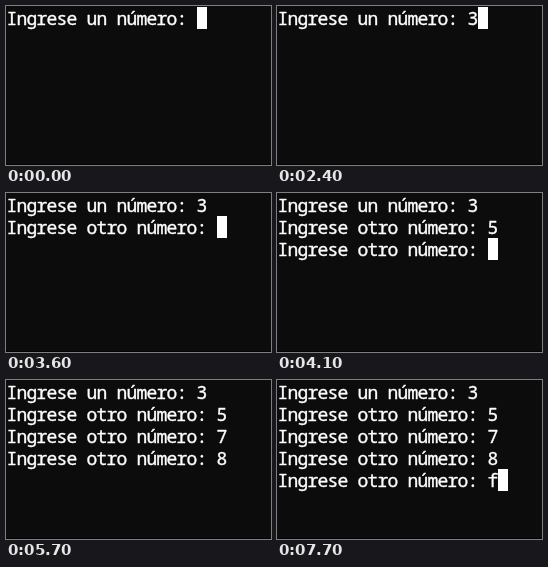
Animation, 265 px wide and 159 px high, one loop 8000 ms. Source, as an HTML page with a canvas:

```html
<!DOCTYPE html>
<html lang="es">
<head>
<meta charset="utf-8">
<style>
html, body { margin: 0; width: 100%; height: 100%; overflow: hidden; background: #0c0c0c; }
canvas { display: block; }
</style>
</head>
<body>
<canvas id="term" width="265" height="159"></canvas>
<script>
const ctx = document.getElementById('term').getContext('2d');
const LOOP = 8000, CELL = 10, ROW = 22;

// [start ms, answers so far (a comma is Enter), cursor visible]
const steps = [
  [0, '', 1], [500, '', 0], [1100, '', 1],
  [1700, '3', 1], [2200, '3', 0], [2400, '3', 1],
  [2900, '3,', 1], [3000, '3,', 0], [3600, '3,', 1],
  [3900, '3,5', 1], [4100, '3,5,', 1],
  [4800, '3,5,7', 1], [4900, '3,5,7,', 1],
  [5200, '3,5,7,8', 1], [5700, '3,5,7,8', 0], [6300, '3,5,7,8', 1],
  [6900, '3,5,7,8,', 1], [7000, '3,5,7,8,', 0], [7600, '3,5,7,8,', 1],
  [7700, '3,5,7,8,f', 1]
];

function draw(t) {
  const [, typed, cursor] = steps.findLast(s => s[0] <= t);
  const lines = typed.split(',').map((answer, i) =>
    `Ingrese ${i ? 'otro' : 'un'} número: ${answer}`);

  ctx.fillStyle = '#0c0c0c';
  ctx.fillRect(0, 0, 265, 159);
  ctx.fillStyle = '#050103';
  ctx.fillRect(0, 158, 265, 1);

  // A thin stroke gives the text its heavier weight.
  ctx.fillStyle = ctx.strokeStyle = '#fff';
  ctx.lineWidth = 0.4;
  ctx.lineJoin = 'round';
  ctx.font = '18px "Noto Sans Mono", "DejaVu Sans Mono", monospace';
  ctx.textAlign = 'center';
  lines.forEach((line, row) => [...line].forEach((ch, col) => {
    const x = 1 + (col + 0.5) * CELL, y = 19 + row * ROW;
    ctx.fillText(ch, x, y);
    ctx.strokeText(ch, x, y);
  }));

  if (cursor) {
    const row = lines.length - 1;
    ctx.fillRect(1 + lines[row].length * CELL, 1 + row * ROW, CELL, ROW);
  }
}

function frame() {
  draw(performance.now() % LOOP);
  requestAnimationFrame(frame);
}
frame();
</script>
</body>
</html>
```
